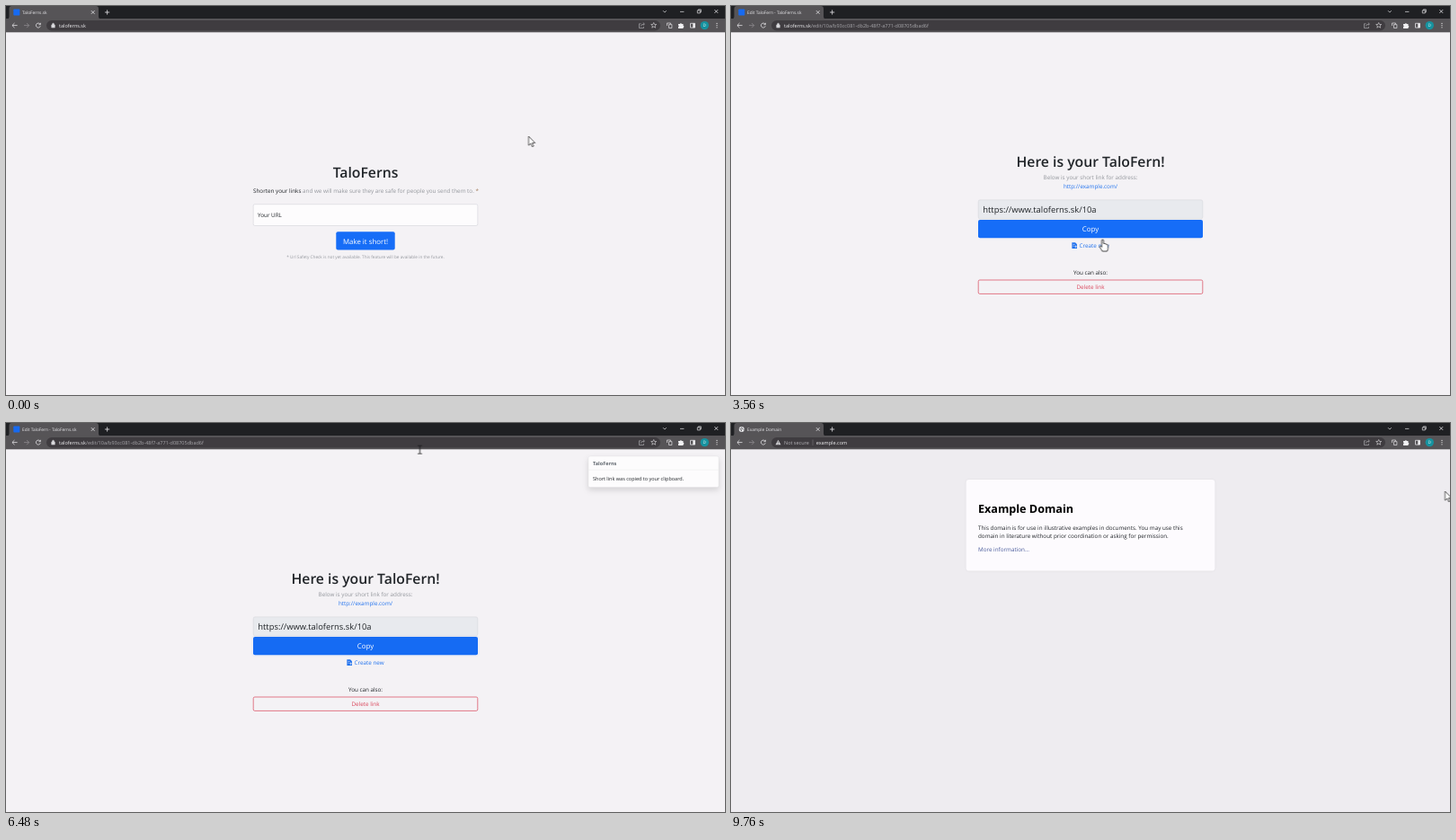
Recreate the animation shown at these times as an HTML page. Size 800 px wide and 433 px high, loop 9.8 s.

```html
<!DOCTYPE html>
<html lang="en">
<head>
<meta charset="utf-8">
<title>TaloFerns.sk</title>
<style>
html, body { margin: 0; width: 100%; height: 100%; overflow: hidden; background: #f4f2f5; }
svg { display: block; width: 100vw; height: 100vh; }
text { font: 6.3px "Open Sans", "Noto Sans", sans-serif; fill: #212529; text-rendering: geometricPrecision; white-space: pre; }
.c { text-anchor: middle; }
.h { font-size: 15.75px; font-weight: 600; }
.big { font-size: 7.87px; }
.url { font-size: 5.5px; fill: #f1f1f3; }
.tab { font-size: 4.8px; fill: #e9e9ec; }
.white { fill: #fff; }
.dim { fill: #a9a8ac; }
.gray { fill: #94979d; }
.blue { fill: #2273ee; }
.line { fill: none; stroke: #e4e3e6; stroke-width: .8; }

/* hard switches */
.on { opacity: 0; animation: 9.8s step-end infinite; }
.home { animation-name: home; }
.edit { animation-name: edit; }
.demo { animation-name: demo; }
.editurl { animation-name: editurl; }
.paste { animation-name: paste; }
.go { animation-name: go; }
.drop { animation-name: drop; }
.idle { animation-name: idle; }
.load { animation-name: load; }
.filled { animation-name: filled; }
.arrow { animation-name: arrow; }
.beam { animation-name: beam; }
.hand { animation-name: hand; }
@keyframes home { 0% { opacity: 1 } 34.3% { opacity: 0 } }
@keyframes edit { 0% { opacity: 0 } 34.3% { opacity: 1 } 78.8% { opacity: 0 } }
@keyframes demo { 0% { opacity: 0 } 78.8% { opacity: 1 } }
@keyframes editurl { 0% { opacity: 0 } 34.3% { opacity: 1 } 69.9% { opacity: 0 } }
@keyframes paste { 0% { opacity: 0 } 69.9% { opacity: 1 } 76.8% { opacity: 0 } }
@keyframes go { 0% { opacity: 0 } 76.8% { opacity: 1 } 78.8% { opacity: 0 } }
@keyframes drop { 0% { opacity: 0 } 69.9% { opacity: 1 } 78% { opacity: 0 } }
@keyframes idle { 0% { opacity: 1 } 31.8% { opacity: 0 } 34.3% { opacity: 1 } 76.8% { opacity: 0 } 78.8% { opacity: 1 } }
@keyframes load { 0% { opacity: 0 } 31.8% { opacity: 1 } 34.3% { opacity: 0 } 76.8% { opacity: 1 } 78.8% { opacity: 0 } }
@keyframes filled { 0% { opacity: 0 } 20% { opacity: 1 } }
@keyframes arrow { 0% { opacity: 1 } 10.3% { opacity: 0 } 24.6% { opacity: 1 } 25.1% { opacity: 0 } 54.6% { opacity: 1 } 60% { opacity: 0 } 86.2% { opacity: 1 } }
@keyframes beam { 0% { opacity: 0 } 10.3% { opacity: 1 } 24.6% { opacity: 0 } 53.7% { opacity: 1 } 54.6% { opacity: 0 } 60% { opacity: 1 } 86.2% { opacity: 0 } }
@keyframes hand { 0% { opacity: 0 } 25.1% { opacity: 1 } 53.7% { opacity: 0 } }

/* soft changes */
.soft { animation: 9.8s linear infinite; }
.focus { animation-name: focus; }
.label { animation-name: label; }
.make { animation-name: make; }
.copy { animation-name: copy; }
.ring { animation-name: ring; }
.toast { animation-name: toast; filter: drop-shadow(0 3px 3px #0002); }
@keyframes focus { 0%, 14.8% { opacity: 0 } 16.3%, 100% { opacity: 1 } }
@keyframes label {
  0%, 14.8% { transform: translate(280px, 235.2px); opacity: 1 }
  15.8%, 100% { transform: translate(280px, 230.2px) scale(.85); opacity: .65 }
}
@keyframes make { 0%, 25.2% { fill: #166df7 } 26.7%, 100% { fill: #115cd3 } }
@keyframes copy {
  0%, 41.5% { fill: #166df7 }
  43%, 47.3% { fill: #1460df }
  48%, 64.8% { fill: #115ad0 }
  66.3%, 100% { fill: #166df7 }
}
@keyframes ring { 0%, 47.3% { opacity: 0 } 48.8%, 64.8% { opacity: 1 } 66.3%, 100% { opacity: 0 } }
@keyframes toast { 0%, 47.3% { opacity: 0 } 48.8%, 100% { opacity: 1 } }

.pointer { animation: move 9.8s ease-in-out infinite; }
@keyframes move {
  0%, 4% { transform: translate(581.5px, 145px) }
  12.3%, 22.4% { transform: translate(436px, 230px) }
  27%, 40% { transform: translate(413.5px, 260px) }
  44%, 52% { transform: translate(415.5px, 253.5px) }
  61.2%, 65% { transform: translate(460px, 29.5px) }
  68%, 85% { transform: translate(461.5px, 30px) }
  96.5%, 100% { transform: translate(794.5px, 76px) }
}
</style>
</head>
<body>
<svg viewBox="0 0 800 433">
  <defs>
    <g id="globe">
      <circle r="3" fill="#e6e6e9"/>
      <path d="M-2.3-.8L-.5.2L-.3 2.2M.2-2.4L-.2-1.2L1.2-.6L2.4.6" fill="none" stroke="#57565a" stroke-width=".9"/>
    </g>
    <path id="lock" d="M-1.8-.6h3.6v3.1h-3.6zM-1-.6v-.8a1 1 0 0 1 2 0v.8" fill="#d9d9dc" stroke="#d9d9dc" stroke-width=".5"/>
    <path id="cross" class="line" d="M-1.9-1.9L1.9 1.9M1.9-1.9L-1.9 1.9"/>
  </defs>

  <rect width="800" height="433" fill="#f4f2f5"/>

  <!-- form page -->
  <g class="on home">
    <text class="c h" x="400" y="190.6">TaloFerns</text>
    <text class="c" x="400.5" y="208.2">Shorten your links<tspan class="gray"> and we will make sure they are safe for people you send them to. </tspan><tspan fill="#a5805f">*</tspan></text>
    <rect class="soft focus" x="273.6" y="219.1" width="252.8" height="27" rx="3" fill="#bfd5fa"/>
    <rect x="275.2" y="220.7" width="249.6" height="23.8" rx="1.7" fill="#fdfcfd" stroke="#d3d4da" stroke-width=".6"/>
    <rect class="soft focus" x="275.2" y="220.7" width="249.6" height="23.8" rx="1.7" fill="none" stroke="#8ab6f8" stroke-width=".6"/>
    <text class="soft label">Your URL</text>
    <text class="on filled" x="280" y="238.8">http://example.com/</text>
    <rect class="soft make" x="367.3" y="251.3" width="65.4" height="20.2" rx="2"/>
    <text class="c big white" x="400" y="264.5">Make it short!</text>
    <text class="c gray" x="400" y="280.6" style="font-size:4.73px">* Url Safety Check is not yet available. This feature will be available in the future.</text>
  </g>

  <!-- result page -->
  <g class="on edit">
    <text class="c h" x="400" y="178.9">Here is your TaloFern!</text>
    <text class="c gray" x="400" y="193">Below is your short link for address:</text>
    <text class="c blue" x="400" y="203.2">http://example.com/</text>
    <rect x="275.2" y="215.9" width="249.6" height="21" rx="2" fill="#e8eaee" stroke="#d3d5da" stroke-width=".6"/>
    <text x="280.3" y="230.2" style="font-size:9.4px">https://www.taloferns.sk/10a</text>
    <rect class="soft ring" x="273.4" y="236.4" width="253.2" height="23.4" rx="3.4" fill="#a9c7f8"/>
    <rect class="soft copy" x="275" y="238" width="250" height="20.2" rx="2"/>
    <text class="c big white" x="400" y="251.3">Copy</text>
    <path class="blue" d="M379.4 263.3h3.6l2 2v4.6h-5.6z"/>
    <path d="M380.5 265.4h2M380.5 267.2h1.2M383.6 266.4v2.8M382.2 267.8h2.8" stroke="#f4f2f5" stroke-width=".6"/>
    <text class="blue" x="387.6" y="269">Create new</text>
    <text class="c" x="400" y="299">You can also:</text>
    <rect x="275.2" y="305" width="249.6" height="15.4" rx="1.6" fill="none" stroke="#d9455a" stroke-width=".7"/>
    <text class="c" x="400" y="315.2" style="fill:#d9455a">Delete link</text>
    <g class="soft toast">
      <rect x="648" y="37" width="145" height="34.6" rx="1.8" fill="#fdfcfd" stroke="#dfdde1" stroke-width=".4"/>
      <path d="M648 52.2h145" stroke="#e9e8eb" stroke-width=".5"/>
      <text x="653" y="46.6" style="font-size:5.5px;font-weight:700;fill:#5f666d">TaloFerns</text>
      <text x="653" y="64" style="font-size:5.5px">Short link was copied to your clipboard.</text>
    </g>
  </g>

  <!-- destination page -->
  <g class="on demo">
    <rect y="29" width="800" height="404" fill="#eeecf0"/>
    <rect x="261.6" y="63" width="276.8" height="101.6" rx="3.4" fill="#fdfbfe" style="filter:drop-shadow(0 .8px 1.2px #0001)"/>
    <text x="275" y="99.6" style="font-size:12.6px;font-weight:700;fill:#000">Example Domain</text>
    <text x="275" y="119.2">This domain is for use in illustrative examples in documents. You may use this</text>
    <text x="275" y="127.9">domain in literature without prior coordination or asking for permission.</text>
    <text x="275" y="143.3" style="fill:#4a5c9c">More information...</text>
  </g>

  <!-- browser frame -->
  <rect width="800" height="15" fill="#1f2023"/>
  <rect y="14" width="800" height="15.3" fill="#565457"/>
  <path d="M1 14.5q2.5 0 2.5-3V3q0-3 3-3H100q3 0 3 3v8.500q0 3 2.500 3z" fill="#565457"/>
  <rect x="45" y="16" width="683" height="11.400" rx="5.700" fill="#3f3c40"/>

  <g class="on home">
    <rect x="8.300" y="3.500" width="7" height="7" rx=".8" fill="#176af0"/>
    <text class="tab" x="18" y="8.800">TaloFerns.sk</text>
    <use href="#lock" x="52.500" y="21.600"/>
    <text class="url" x="59" y="23.600">taloferns.sk</text>
  </g>
  <g class="on edit">
    <g class="on idle"><rect x="8.300" y="3.500" width="7" height="7" rx=".8" fill="#176af0"/></g>
    <text class="tab" x="18" y="8.800">Edit TaloFern - TaloFerns.sk</text>
  </g>
  <g class="on editurl">
    <use href="#lock" x="52.500" y="21.600"/>
    <text class="url" x="59" y="23.600">taloferns.sk<tspan class="dim">/edit/10a/b93cc081-db2b-48f7-a771-d08705dbad6f</tspan></text>
  </g>
  <g class="on demo">
    <use href="#globe" x="11.800" y="7"/>
    <text class="tab" x="18" y="8.800">Example Domain</text>
    <path d="M52.500 18.800l3 5.400h-6z" fill="#d0d0d3"/>
    <path d="M52.500 20.600v1.700M52.500 22.900v.6" stroke="#3f3c40" stroke-width=".6"/>
    <text class="url" x="59" y="23.600" style="fill:#b5b4b8">Not secure</text>
    <path d="M91 18.500v6.500" stroke="#858387" stroke-width=".5"/>
    <text class="url" x="94.700" y="23.600">example.com</text>
  </g>

  <!-- suggestions -->
  <g class="on drop">
    <path d="M43 20q0-5 4-5H727q4 0 4 5v41q0 3-3 3H46q-3 0-3-3z" fill="#202124" style="filter:drop-shadow(0 1px 2px #0006)"/>
    <rect x="43" y="15" width="688" height="13.800" rx="4" fill="#3f3c40"/>
    <rect x="43" y="29.500" width="688" height="15.700" fill="#3b3c40"/>
    <rect x="43" y="29.500" width="1.300" height="15.700" fill="#79a9f2"/>
    <use href="#globe" x="52.500" y="37.200"/>
    <text class="url" x="64" y="39.200" style="font-weight:700;fill:#6ea4f5">https://www.taloferns.sk/10a</text>
    <circle class="line" cx="52" cy="52.400" r="1.600"/>
    <path class="line" d="M53.200 53.600l1.900 1.900"/>
    <text class="url" x="64" y="55" style="font-size:5.300px;font-weight:600">https://www.taloferns.sk/10a<tspan class="dim" font-weight="400"> - Vontro Search</tspan></text>
  </g>
  <g class="on paste">
    <use href="#globe" x="52.500" y="21.600"/>
    <text class="url" x="59" y="23.600">https://www.taloferns.sk/10a</text>
  </g>
  <g class="on go">
    <circle class="line" cx="52.500" cy="21.600" r="2.500" stroke-width=".6"/>
    <path class="line" d="M52.500 21.200v1.700M52.500 20v.6"/>
    <text class="url" x="59" y="23.600">taloferns.sk<tspan class="dim">/10a</tspan></text>
  </g>

  <!-- toolbar icons -->
  <use href="#cross" x="96.700" y="7"/>
  <path class="line" d="M110 7h5.200M112.600 4.400v5.200"/>
  <path class="line" d="M12.600 21.600H7M9.500 19L6.900 21.600L9.500 24.200"/>
  <path class="line" d="M20 21.600h5.600M23.100 19l2.600 2.600l-2.600 2.600" style="stroke:#8e8c90"/>
  <g class="on idle"><path class="line" d="M38 20.200A2.500 2.500 0 1 0 38.300 22.300M38.400 18.800v1.900h-1.900"/></g>
  <g class="on load"><use href="#cross" x="35.800" y="21.600"/></g>
  <path class="line" d="M706.500 19.800h-2v4.700h5v-1.500M706.200 22.700q.4-2.500 3.800-2.600M708.800 18.500l1.700 1.600l-1.700 1.600" style="stroke:#bdbcc0;stroke-width:.6"/>
  <path class="line" d="M720.700 18.500l.9 2h2.100l-1.700 1.500l.6 2.200l-1.900-1.200l-1.900 1.200l.6-2.200l-1.700-1.500h2.100z" style="stroke-width:.6"/>
  <path class="line" d="M735.500 22v-3h4v1.300M737.500 20.600h3.400v3.900h-3.400z" style="stroke-width:.7"/>
  <path d="M748 20h1.700a1.200 1.200 0 0 1 2.300 0h1.500v1.700a1.200 1.200 0 0 1 0 2.300v1H748v-1.700a1 1 0 0 0 0-1.800z" fill="#f1f1f3"/>
  <path class="line" d="M761.500 19.300h5v4.800h-5z"/>
  <path d="M764.300 19.300h2.200v4.800h-2.200z" fill="#f1f1f3"/>
  <circle cx="777.300" cy="21.600" r="4.700" fill="#16929f"/>
  <text class="c white" x="777.300" y="23.300" style="font-size:4.600px">D</text>
  <path d="M791 19.400h.01M791 21.600h.01M791 23.800h.01" stroke="#eee" stroke-width="1.200" stroke-linecap="round"/>
  <path class="line" d="M731 5.200l1.900 1.900l1.900-1.900M750 6.400h4.400M769.300 4.900h3v3h-3zM770.300 4.800v-.9h3v3h-.9" style="stroke-width:.7"/>
  <use href="#cross" x="790.300" y="6"/>

  <g class="pointer">
    <path class="on arrow" d="M0 0V10.200L2.400 8L4 11.700L5.600 11L4 7.400H7.200z" fill="#fff" stroke="#1a1a1a" stroke-width=".7"/>
    <path class="on beam" d="M-2.300-4.500H-.7L0-4.100L.7-4.500H2.300M0-4.100V4.100M-2.300 4.500H-.7L0 4.100L.7 4.500H2.300" fill="none" stroke="#1c1c1e" stroke-width=".9"/>
    <path class="on hand" d="M-1 1Q-1 0 0 0Q1 0 1 1V4.400Q2.500 3.900 3 5Q4.400 4.500 4.700 5.600Q6.100 5.400 6 7V9.400Q6 11 5 13H-.4Q-1.200 11.200-3 8.800Q-3.700 7.500-2.700 7.200Q-1.800 7-1 8.400z" fill="#fff" stroke="#1a1a1a" stroke-width=".8"/>
  </g>
</svg>
</body>
</html>
```
